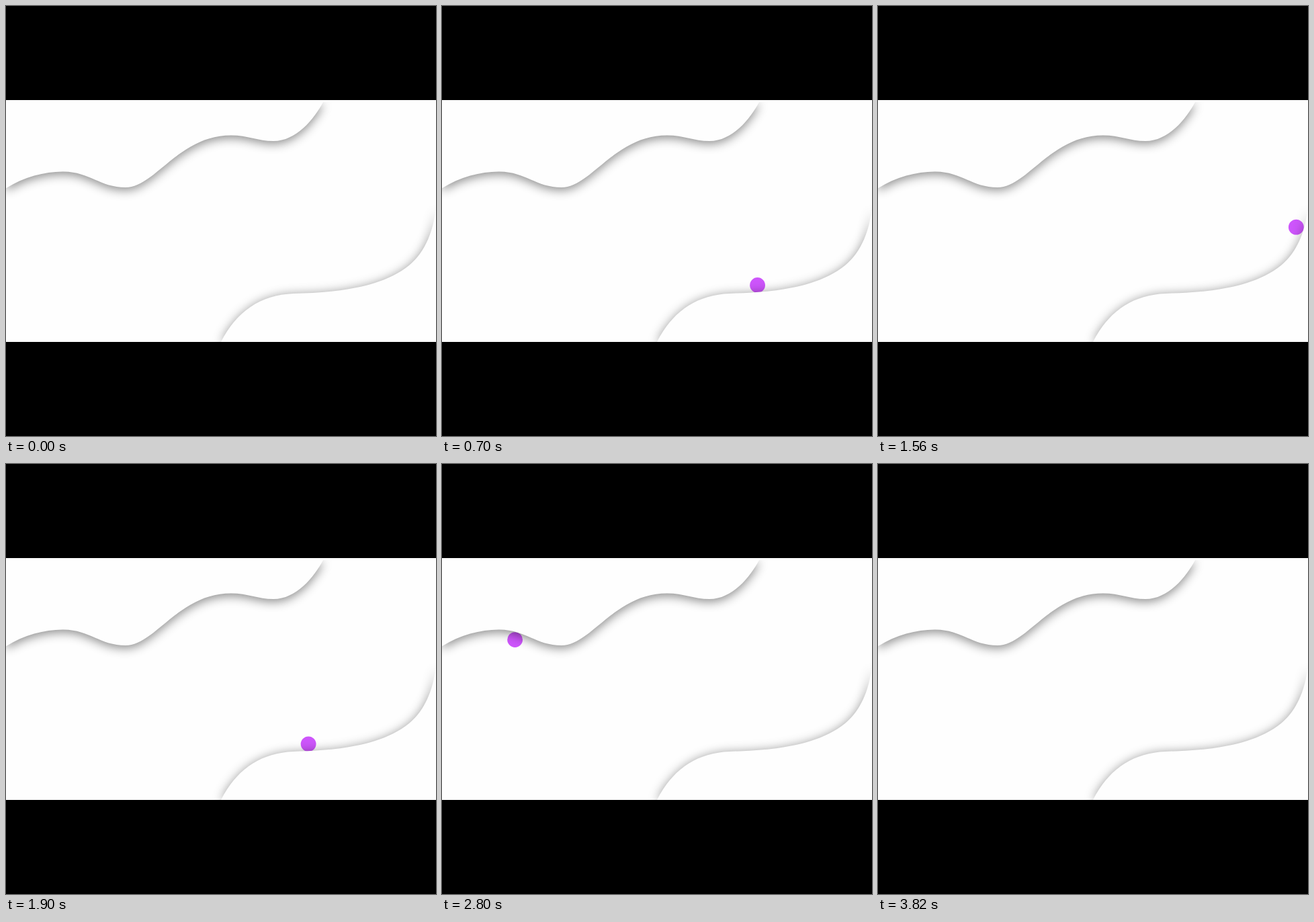
Write an HTML page that moves like this. It is 640 by 640 pixels and loops after 4.8 s.

```html
<!DOCTYPE html>
<html lang="en">
<head>
<meta charset="utf-8">
<title>Rolling ball</title>
<style>
  html, body { margin: 0; width: 100%; height: 100%; overflow: hidden; background: #000; }
  svg { display: block; width: 100vw; height: 100vh; }
  .sheet { fill: #fefefe; }
  #upper { filter: drop-shadow(0 4px 7.5px rgba(0, 0, 0, .45)); }
  #lower { filter: drop-shadow(0 1px 7.5px rgba(0, 0, 0, .4)); }
</style>
</head>
<body>
<svg viewBox="0 0 640 640">
  <defs>
    <clipPath id="panel"><rect y="140" width="640" height="360"/></clipPath>
    <clipPath id="sheets"><rect y="143" width="640" height="357"/></clipPath>
    <path id="lowTrack" d="M285 547L290 537C318 462 366 417.5 426 417.5C490 417 556 406 592 376.5C612.5 359 622.5 332 629.6 306.5"/>
    <path id="highTrack" d="M-30 301C15 272 55 258 84 258C121 258 141 281.5 177 281.5C226 281.5 258 201.5 335 201.5C360 201.5 375 211 398 211C440 211 470 176 484 142L506 89"/>
  </defs>
  <g clip-path="url(#panel)">
    <rect class="sheet" y="140" width="640" height="360"/>
    <circle id="ball" r="11.4" fill="#cd55fb"/>
    <g clip-path="url(#sheets)">
      <path id="upper" class="sheet" d="M0 271.3C27 254 60 246 86 246.5C125 247 140 270 178 270C222 270 257 192.5 335 192.5C360 192.5 375 201 398 201C432 201 458 169 472 143H0Z"/>
      <path id="lower" class="sheet" d="M320 500C343 455 378 430 428 428C500 426 560 418 600 386C625 366 637 330 639 305H640V500Z"/>
    </g>
  </g>
</svg>
<script>
const LOOP = 4800;
const HIDDEN_START = 36;
const byId = id => document.getElementById(id);
const ball = byId('ball'), low = byId('lowTrack'), high = byId('highTrack');
const lowEnd = low.getTotalLength(), highEnd = high.getTotalLength();

// The ball rolls up the lower edge, drops back, then climbs the upper edge.
const rolls = [
  { track: low, start: 0, end: 1400, from: HIDDEN_START, to: lowEnd },
  { track: low, start: 1400, end: 2400, from: lowEnd, to: 0 },
  { track: high, start: 2120, end: 4120, from: 0, to: highEnd }
];

const easeInOut = p => p < .5 ? 2 * p * p : 1 - 2 * (1 - p) ** 2;

function draw(t) {
  const roll = rolls.find(r => t < r.end) || rolls[2];
  const p = Math.min(1, (t - roll.start) / (roll.end - roll.start));
  const { x, y } = roll.track.getPointAtLength(roll.from + (roll.to - roll.from) * easeInOut(p));
  ball.setAttribute('cx', x);
  ball.setAttribute('cy', y);
}

const begin = performance.now();
function tick() {
  draw((performance.now() - begin) % LOOP);
  requestAnimationFrame(tick);
}
tick();
</script>
</body>
</html>
```
